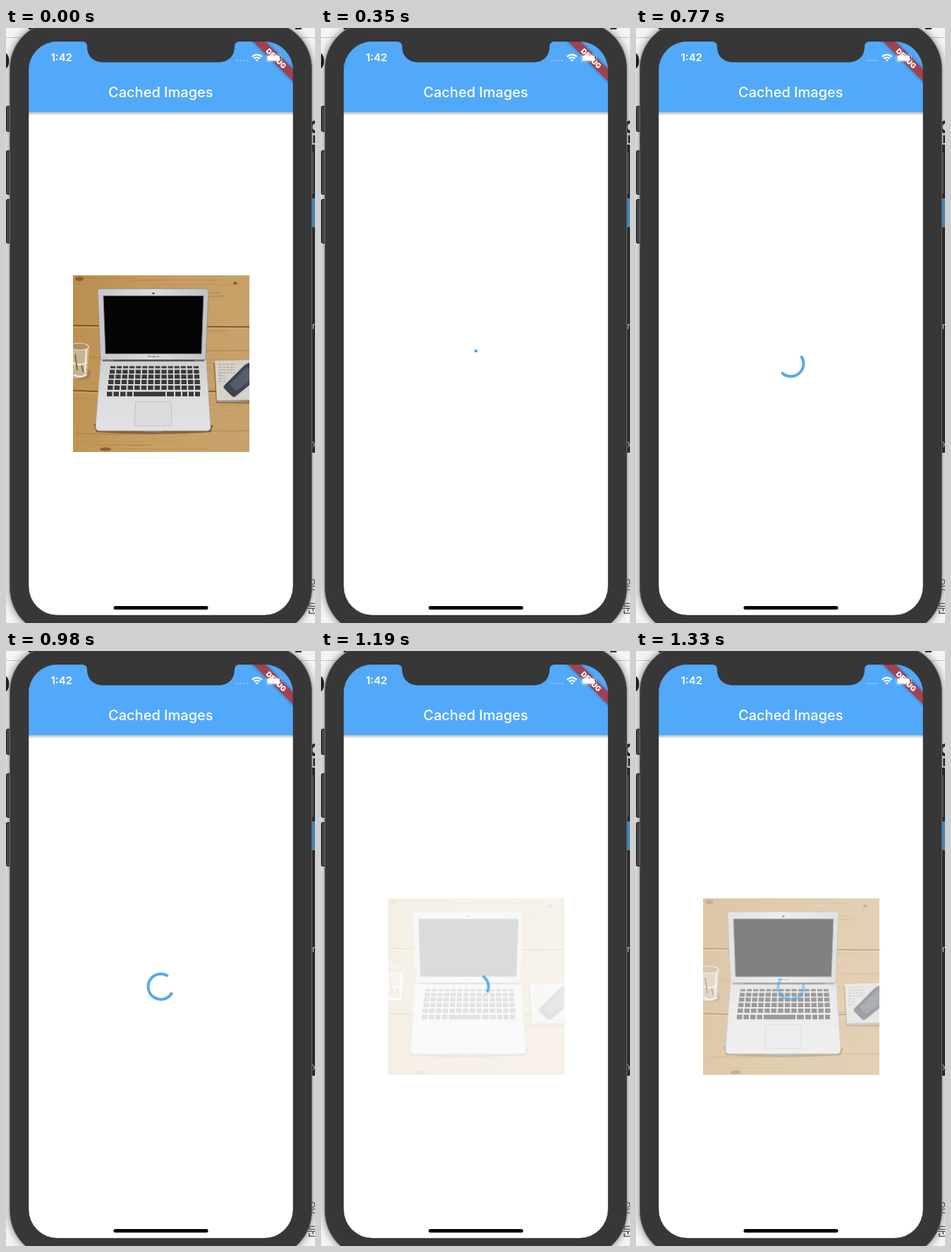
These frames come from a looping animation (438 by 842 pixels, 1400 ms). An HTML page:

```html
<!DOCTYPE html>
<html lang="en">
<head>
<meta charset="utf-8">
<title>Cached Images</title>
<style>
  html, body { margin: 0; width: 100%; height: 100%; overflow: hidden; background: #f3f3f3; }
  svg { display: block; width: 438px; height: 842px; }
  text { font-family: Inter, Roboto, sans-serif; }
  .cjk { font-family: "Noto Sans CJK KR", "Noto Sans CJK", sans-serif; }
</style>
</head>
<body>
<svg viewBox="0 0 438 842">
  <defs>
    <clipPath id="screen"><rect x="32" y="19" width="375" height="812" rx="41"/></clipPath>
    <clipPath id="frame"><rect x="95" y="350" width="250" height="250"/></clipPath>
    <filter id="soft" x="-20%" y="-20%" width="140%" height="140%"><feGaussianBlur stdDeviation="6"/></filter>
    <filter id="blur" x="-20%" y="-60%" width="140%" height="220%"><feGaussianBlur stdDeviation="2.2"/></filter>
    <linearGradient id="wood" x2="1" y2="0.25">
      <stop stop-color="#b98d4e"/><stop offset=".5" stop-color="#c69c60"/><stop offset="1" stop-color="#c8a26b"/>
    </linearGradient>
    <linearGradient id="lid" x2="1" y2="0">
      <stop stop-color="#c6c6c8"/><stop offset=".5" stop-color="#dcdcde"/><stop offset="1" stop-color="#c2c2c4"/>
    </linearGradient>
    <linearGradient id="base" x2="0" y2="1">
      <stop stop-color="#cfd0d2"/><stop offset=".5" stop-color="#dcdcde"/><stop offset="1" stop-color="#e2e2e4"/>
    </linearGradient>
    <linearGradient id="bar" x2="0" y2="1">
      <stop stop-color="#000" stop-opacity=".28"/><stop offset="1" stop-color="#000" stop-opacity="0"/>
    </linearGradient>
  </defs>

  <!-- desktop behind the device -->
  <g>
    <rect width="438" height="842" fill="#f4f4f4"/>
    <path d="M0 13.5H438" stroke="#c4c4c4"/>
    <path d="M32 0h13v2h-13zM410 0h9v2h-9z" fill="#333"/>
    <text x="-17" y="59" font-size="34" font-weight="700" fill="#222">0</text>
    <text class="cjk" x="428" y="160" font-size="36" font-weight="700" fill="#333">연</text>
    <rect x="428" y="165" width="10" height="436" fill="#343434"/>
    <rect x="428" y="241" width="10" height="41" fill="#4ea6e2"/>
    <rect x="5" y="-9" width="429" height="868" rx="67" fill="#000" opacity=".5" filter="url(#soft)"/>
    <text class="cjk" x="429" y="794" font-size="18" fill="#555">영</text>
    <text class="cjk" x="426" y="828" font-size="20" fill="#555">분</text>
  </g>

  <!-- device -->
  <g fill="#454545" stroke="#1c1c1c">
    <rect x="0.5" y="110.5" width="9" height="36" rx="2"/>
    <rect x="0.5" y="173.5" width="9" height="62" rx="2"/>
    <rect x="0.5" y="242.5" width="9" height="62" rx="2"/>
    <rect x="428.5" y="174.5" width="9" height="61" rx="2"/>
  </g>
  <rect x="5.5" y="-8.5" width="428" height="867" rx="66" fill="#373737" stroke="#6b6b6b"/>
  <text x="434" y="426" font-size="11" fill="#ddd">n</text>
  <text x="434" y="591" font-size="10" fill="#bbb">y</text>

  <g clip-path="url(#screen)">
    <rect x="32" y="19" width="375" height="812" fill="#fff"/>
    <rect x="32" y="119" width="375" height="5" fill="url(#bar)"/>
    <rect x="32" y="19" width="375" height="100" fill="#52a9f9"/>
    <text x="219.3" y="98" font-size="20" font-weight="500" fill="#fff" text-anchor="middle">Cached Images</text>

    <g id="photo" clip-path="url(#frame)">
      <rect x="95" y="350" width="250" height="250" fill="url(#wood)"/>
      <g id="grain" fill="none" stroke="#8d6430"/>
      <path d="M95 421l90 1 160 1M95 513l60 2 190 -1" stroke="#6b4a26" stroke-width="1.6" fill="none"/>
      <path d="M95 423.5l250 1.5M95 516l250 1" stroke="#dcb982" opacity=".6"/>
      <g fill="#76502a" opacity=".75">
        <ellipse cx="104" cy="355" rx="6" ry="3"/>
        <ellipse cx="141" cy="596" rx="8" ry="2.5"/>
        <ellipse cx="325" cy="361" rx="3" ry="2"/>
      </g>

      <g>
        <ellipse cx="106" cy="489" rx="14" ry="9" fill="#8d6c42" opacity=".5"/>
        <path d="M92 449q13-7 26 1l-3 42q-10 7-23 2z" fill="#cfc1a7" opacity=".75"/>
        <ellipse cx="104" cy="451" rx="13" ry="5" fill="#ae9163" stroke="#e8e0d2" stroke-width="1.2"/>
        <path d="M95 474q10 5 20-1M96 491q10 5 18-1M114 455l-2 33" fill="none" stroke="#f6f1e8" stroke-width="2"/>
        <path d="M98 462l3 22M107 478l3 9" stroke="#82694a" stroke-width="2"/>
      </g>

      <path d="M294 474l51 1v57l-47-1z" fill="#725330" opacity=".55"/>
      <path d="M296 471l49-1v58l-46 1z" fill="#d5d2ca"/>
      <path d="M299 528l46-1" stroke="#9b958a" stroke-width="2"/>
      <path id="notes" stroke="#8d8b86" stroke-width=".8" stroke-dasharray="5 1.5 3 1"/>
      <path d="M310 505L337 478Q341 474 347 473V504L326 521Q322 524 319 520L309 510Q307 508 310 505Z" fill="#3e434c" stroke="#a3a5a8"/>
      <path d="M317 504L341 480L347 485V498L326 514Z" fill="#555d6b"/>

      <path d="M124 560L128 572Q208 577 290 572L294 562Z" fill="#5c401f" opacity=".6"/>
      <path d="M134 369H282Q287 369 287 374L283 470H134L130 374Q129 369 134 369Z" fill="url(#lid)" stroke="#8c8a88" stroke-width=".8"/>
      <path d="M138 379H280L277 461H141Z" fill="#050505" stroke="#77777a" stroke-width=".8"/>
      <circle cx="209" cy="375.5" r="1.5" fill="#444"/>
      <text x="209" y="466.4" font-size="3.6" fill="#555" text-anchor="middle">Notebook</text>
      <path d="M134 470H284L290 564Q290 570 284 570H133Q127 570 127 564Z" fill="url(#base)" stroke="#a5a4a3" stroke-width=".8"/>
      <path d="M137 470.5H281" stroke="#77787b" stroke-width="3"/>
      <path d="M152 470.5H267" stroke="#505154" stroke-width="2"/>
      <g id="keys" fill="none" stroke="#38393b"/>
      <path d="M184 529H234L235 563H182Z" fill="#dcdcde" stroke="#bdbdc0" stroke-width=".9"/>
      <path d="M195 570h27l-2 2h-23z" fill="#8d8d8f"/>
    </g>

    <path id="arc" fill="none" stroke="#52a9ee" stroke-width="4" stroke-linecap="square"/>

    <g transform="translate(407 19) rotate(45)">
      <rect x="-44" y="28" width="88" height="12" fill="#000" opacity=".45" filter="url(#blur)"/>
      <rect x="-44" y="28" width="88" height="12" fill="#a3414f"/>
      <text x="0" y="37.8" font-size="10.2" font-weight="900" fill="#fff" text-anchor="middle">DEBUG</text>
    </g>

    <text x="63.5" y="47" font-size="15" font-weight="600" fill="#fff">1:42</text>
    <path d="M327.5 46h16" stroke="#fff" stroke-width="2.6" stroke-linecap="round" stroke-dasharray="0 4.7" opacity=".35"/>
    <g fill="none" stroke="#fff" stroke-width="2.3">
      <path d="M348.8 40.6q6.9-6 13.8 0M351.4 43.4q4.3-3.6 8.6 0"/>
      <path d="M353.4 45.2q2.3-1.6 4.6 0l-2.3 2.4z" fill="#fff" stroke="none"/>
    </g>
    <rect x="368.5" y="37" width="22" height="11" rx="3" fill="none" stroke="#fff" opacity=".4"/>
    <rect x="370.3" y="38.7" width="17.5" height="7.8" rx="1.6" fill="#fff"/>

    <rect x="152.5" y="818" width="134" height="5" rx="2.5" fill="#000"/>
  </g>
  <rect x="32" y="19" width="375" height="812" rx="41" fill="none" stroke="#222" stroke-opacity=".4"/>
  <path d="M106 17V18.5Q115 19 115 26C115 40 124 48.5 138 48.5H301C315 48.5 324 40 324 26Q324 19 333 18.5V17Z" fill="#373737"/>
</svg>

<script>
const $ = id => document.getElementById(id);
const LOOP = 1400, STEP = 70;

function addPath(parent, attrs) {
  const p = document.createElementNS("http://www.w3.org/2000/svg", "path");
  for (const k in attrs) p.setAttribute(k, attrs[k]);
  parent.append(p);
}

// Keyboard rows, each a dashed stroke
[480, 486.4, 493.4, 501, 509, 518].forEach((y, i) => {
  const left = 148 - i, right = 273 + i * 0.6, pitch = (right - left + 2) / 14;
  addPath($("keys"), {
    d: `M${left} ${y}H${right}`,
    "stroke-width": i ? 5 + i * 0.3 : 3,
    "stroke-dasharray": i < 5 ? `${pitch - 2} 2` : "7.5 2 7.5 2 7.5 2 7.5 2 45 2 10 2 8 2 7 2 7 2 7 9"
  });
});

// Wood grain
let seed = 7;
const rand = () => (seed = seed * 16807 % 2147483647) / 2147483647;
for (let i = 0; i < 46; i++) {
  const y = 352 + i * 5.4, x = 95 + rand() * 150, bend = rand() * 8 - 4;
  addPath($("grain"), {
    d: `M${x} ${y}q40 ${bend} ${60 + rand() * 90} ${bend / 2}`,
    "stroke-width": 0.6 + rand() * 1.6,
    opacity: 0.1 + rand() * 0.2
  });
}

let lines = "";
for (let y = 476; y < 502; y += 4) lines += `M301 ${y}H${y < 490 ? 324 : 311}`;
$("notes").setAttribute("d", lines);

function bezier(x1, y1, x2, y2) {
  const at = (a, b, s) => 3 * a * s * (1 - s) ** 2 + 3 * b * s * s * (1 - s) + s ** 3;
  return x => {
    if (x <= 0) return 0;
    if (x >= 1) return 1;
    let lo = 0, hi = 1;
    for (let i = 0; i < 24; i++) {
      const mid = (lo + hi) / 2;
      if (at(x1, x2, mid) < x) lo = mid; else hi = mid;
    }
    return at(y1, y2, lo);
  };
}
const fastOutSlowIn = bezier(0.4, 0, 0.2, 1);
const easeIn = bezier(0.42, 0, 1, 1);

// Indeterminate progress arc; t is the phase of its first turn
function arcPath(t) {
  const head = fastOutSlowIn(t * 2), tail = fastOutSlowIn(t * 2 - 1);
  const start = Math.PI * (-0.5 + 1.5 * tail + 1.7 * t);
  const sweep = Math.max(1.5 * Math.PI * (head - tail), 0.005);
  const point = a => `${219.5 + 18 * Math.cos(a)} ${475 + 18 * Math.sin(a)}`;
  return `M${point(start)}A18 18 0 ${sweep > Math.PI ? 1 : 0} 1 ${point(start + sweep)}`;
}

const LOAD = 350, SPIN = 575, REVEAL = 1060, FADE = 410;

function draw(ms) {
  const fade = ms - REVEAL;
  let photo = 0, spinner = 1;
  if (ms < LOAD) {
    photo = 1;
    spinner = 0;
  } else if (fade > 0) {
    photo = easeIn(fade / FADE);
    spinner = 1 - (fade / 375) ** 2;
  }
  $("photo").setAttribute("opacity", photo);
  $("arc").setAttribute("opacity", spinner);
  $("arc").setAttribute("d", arcPath(Math.max(0, fade > 0 ? fade : ms - SPIN) / 1000));
}

function tick() {
  draw(Math.floor(performance.now() % LOOP / STEP) * STEP);
  requestAnimationFrame(tick);
}
tick();
</script>
</body>
</html>
```
